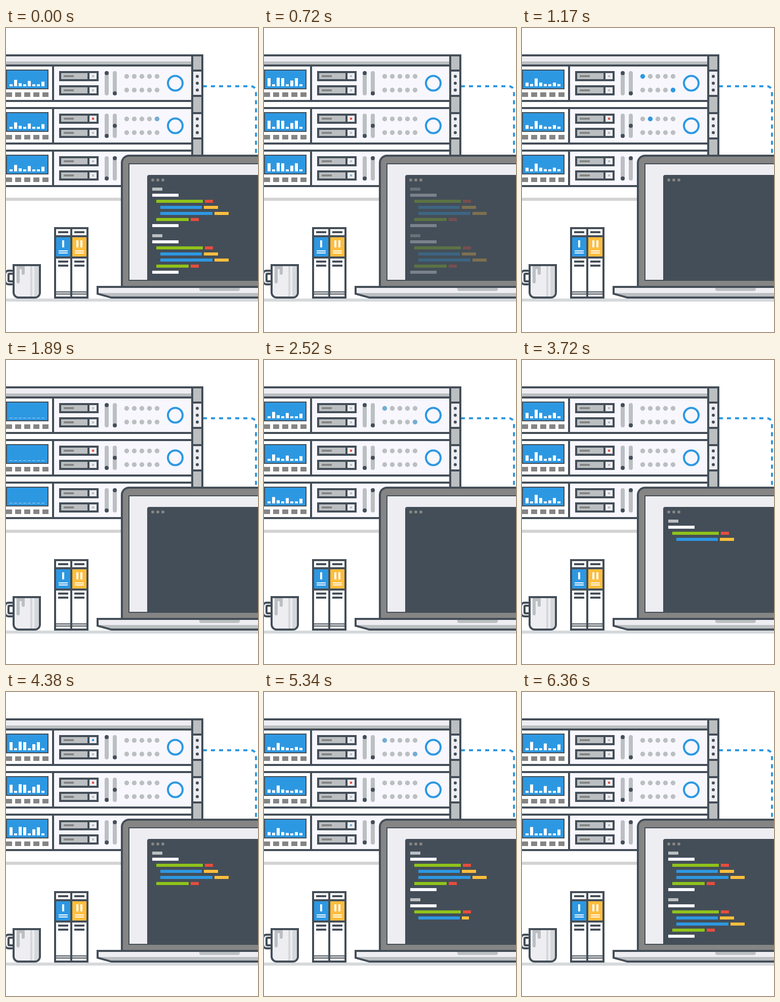
Write an HTML page with a canvas that moves like this. It is 498x600 px and loops after 6390 ms.

```html
<!DOCTYPE html>
<html lang="en">
<head>
<meta charset="utf-8">
<title>Server room desk</title>
<style>
html, body { margin: 0; width: 100%; height: 100%; overflow: hidden; background: #fff; }
canvas { display: block; width: 498px; height: 600px; }
</style>
</head>
<body>
<canvas id="stage" width="498" height="600"></canvas>
<script>
const ctx = document.getElementById('stage').getContext('2d');
const LOOP = 6390, STEP = 30;
const DARK = '#444e58', LIGHT = '#ededf2', PALE = '#f7f7fd', GRAY = '#bbbfc1', MID = '#858585',
      BLUE = '#2d98e2', RED = '#e84c3d', GREEN = '#8fc31a', YELLOW = '#ffbe3d', WHITE = '#fff';

// Rectangles are given by their edges: left, top, right, bottom.
function box(color, x0, y0, x1, y1) {
  ctx.fillStyle = color;
  ctx.fillRect(x0, y0, x1 - x0, y1 - y0);
}
function round(color, x0, y0, x1, y1, r) {
  ctx.fillStyle = color;
  ctx.beginPath();
  ctx.roundRect(x0, y0, x1 - x0, y1 - y0, r);
  ctx.fill();
}
function disc(color, x, y, r) {
  ctx.fillStyle = color;
  ctx.beginPath();
  ctx.arc(x, y, r, 0, Math.PI * 2);
  ctx.fill();
}
function poly(color, points) {
  ctx.fillStyle = color;
  ctx.beginPath();
  points.forEach(([x, y]) => ctx.lineTo(x, y));
  ctx.fill();
}
const clamp = v => Math.max(0, Math.min(1, v));
const mod = (a, n) => ((a % n) + n) % n;
const smooth = v => { v = clamp(v); return v * v * (3 - 2 * v); };

// Blinking lamps: first start and period in ms
const lamps = {
  dot00: [1080, 1410], dot09: [1080, 1410], dot11: [1080, 1500], dot14: [-30, 1605],
  led00: [330, 1320], led20: [110, 1300], led21: [500, 1100]
};
function lampColor(name, t) {
  if (!lamps[name]) return GRAY;
  const [first, period] = lamps[name];
  const age = mod(t - first, period);
  const k = clamp(Math.min(age, 240 - age) / 60);
  const mix = (a, b) => Math.round(a + (b - a) * k);
  return `rgb(${mix(187, 45)},${mix(191, 152)},${mix(193, 226)})`;
}

// Each group of bars swells once per beat; all sink to the base line once per loop.
const BEAT = 553, REST = 1980;
function barHeights(t) {
  const phase = mod((t + LOOP - REST) % LOOP / BEAT + 0.13, 1);
  const bump = (center, width, gain) => {
    const d = Math.abs(phase - center);
    return smooth(gain * (1 - Math.min(d, 1 - d) / width));
  };
  const a = 14 * bump(0, 0.25, 1), b = 12 * bump(0.47, 0.35, 1.2),
        c = 13 * bump(0.4, 0.35, 1.6), d = 8 * bump(0.5, 0.3, 1.2);
  const scale = smooth((Math.abs(t - REST) - 80) / 250);
  return [b, a, c, b, a * 0.75, d, b, a * 0.6].map(h => Math.max(0.6, (4 + h) * scale));
}

function drive(y, led) {
  box(DARK, 105, y, 183, y + 20);
  box(GRAY, 109, y + 4, 161, y + 16);
  box(LIGHT, 165, y + 4, 179, y + 16);
  box(MID, 114, y + 8, 134, y + 12);
  box(led, 170, y + 8, 174, y + 12);
}
function slider(x, y, knob) {
  round(GRAY, x - 4, y, x + 4, y + 48, 4);
  disc(DARK, x, y + knob, 4);
}
function unit(row, t) {
  const y = 72 + row * 84;
  box(DARK, 0, y, 370, y + 74);
  box(WHITE, 0, y + 4, 91, y + 70);
  box(PALE, 95, y + 4, 366, y + 70);

  box(DARK, 0, y + 10, 84, y + 49);
  box(BLUE, 2, y + 12, 82, y + 47);
  barHeights(t).forEach((h, i) => box(WHITE, 7 + i * 9, y + 43 - h, 13 + i * 9, y + 43));
  for (let i = 0; i < 5; i++) box(MID, i * 18, y + 55, i * 18 + 12, y + 64);

  drive(y + 13, row === 1 ? RED : lampColor(`led${row}0`, t));
  drive(y + 41, lampColor(`led${row}1`, t));
  slider(199, y + 13, row ? 44 : 4);
  slider(215, y + 13, [44, 24, 4][row]);

  for (let i = 0; i < 10; i++) {
    disc(lampColor(`dot${row}${i}`, t), 238.5 + i % 5 * 15, y + (i < 5 ? 23.5 : 50.5), 4.7);
  }
  ctx.strokeStyle = BLUE;
  ctx.lineWidth = 4;
  ctx.beginPath();
  ctx.arc(334.5, y + 37, 14.5, 0, Math.PI * 2);
  ctx.stroke();
}
function rack(t) {
  box(DARK, 0, 52, 390, 76);
  box(LIGHT, 0, 56, 366, 66);
  box(GRAY, 0, 66, 366, 72);
  for (let row = 0; row < 3; row++) unit(row, t);

  box(DARK, 366, 52, 390, 314);
  box(GRAY, 370, 56, 386, 310);
  for (const y of [82, 166]) {
    box(DARK, 370, y, 386, y + 54);
    box(LIGHT, 370, y + 4, 386, y + 50);
    for (const dy of [13.5, 27, 40.5]) disc(DARK, 378, y + dy, 3);
  }
  box('#d3d3d3', 0, 335, 240, 341);
}
function cable() {
  ctx.strokeStyle = BLUE;
  ctx.lineWidth = 4;
  ctx.setLineDash([8, 8]);
  ctx.lineDashOffset = 1;
  ctx.beginPath();
  ctx.moveTo(390, 115);
  ctx.lineTo(484, 115);
  ctx.arcTo(494, 115, 494, 125, 10);
  ctx.lineTo(494, 252);
  ctx.stroke();
  ctx.setLineDash([]);
}

// The code is one block shown twice: row, left edge, width, colour
const block = [
  [0, 289, 20, GRAY], [1, 289, 52, PALE],
  [2, 297, 92, GREEN], [2, 393, 16, RED],
  [3, 305, 82, BLUE], [3, 391, 28, YELLOW],
  [4, 305, 103, BLUE], [4, 412, 28, YELLOW],
  [5, 297, 64, GREEN], [5, 365, 16, RED],
  [6, 289, 52, PALE]
];
const TYPE_START = 2878, TYPE_GAP = 152, TYPE_TIME = 60;
function code(t) {
  const typing = t > REST;
  ctx.globalAlpha = typing ? 1 : 1 - smooth((t - 510) / 330);
  for (let i = 0; i < block.length * 2; i++) {
    const [row, x, w, color] = block[i % block.length];
    const y = (i < block.length ? 315 : 407) + row * 12;
    const shown = typing ? smooth((t - TYPE_START - i * TYPE_GAP) / TYPE_TIME) : 1;
    box(color, x, y, x + w * shown, y + 6);
  }
  ctx.globalAlpha = 1;
}
function laptop(t) {
  round(DARK, 227, 250, 520, 513, [16, 0, 0, 0]);
  round(MID, 231, 254, 520, 509, [12, 0, 0, 0]);
  box(DARK, 242, 267, 498, 499);
  box(LIGHT, 244, 269, 498, 497);
  round(DARK, 279, 290, 510, 498, [4, 0, 0, 0]);
  for (const x of [290, 300, 310]) disc(MID, x, 300, 3);
  code(t);

  poly(DARK, [[179, 509], [498, 509], [498, 534], [208, 534], [179, 526]]);
  box(LIGHT, 183, 513, 498, 523);
  poly(GRAY, [[183, 523], [498, 523], [498, 530], [208, 530]]);
  round(GRAY, 382, 513, 462, 519, [0, 0, 4, 4]);
}
function binder(x, color, strokes) {
  box(DARK, x - 4, 393, x + 32, 534);
  box(WHITE, x, 397, x + 28, 409);
  box(color, x, 413, x + 28, 451);
  box(WHITE, x, 455, x + 28, 530);
  for (const y of [401, 459, 467]) box(DARK, x + 4, y, x + 24, y + 4);
  for (const y of [520, 524]) box(DARK, x, y, x + 28, y + 2);
  for (const dx of strokes) box(WHITE, x + dx, 419, x + dx + 4, 433);
  for (const y of [439, 443]) box(WHITE, x + 5, y, x + 23, y + 2);
}
function mug() {
  round(DARK, -4, 477, 20, 508, 9);
  round(LIGHT, 0, 481, 20, 504, 5);
  round(DARK, 3, 483, 20, 502, 4);
  round(WHITE, 7, 487, 20, 498, 1);
  round(DARK, 13, 466, 69, 534, [0, 0, 12, 12]);
  ctx.save();
  ctx.beginPath();
  ctx.roundRect(17, 470, 48, 60, [0, 0, 8, 8]);
  ctx.clip();
  box(LIGHT, 17, 470, 65, 530);
  box('#d5d8da', 48, 470, 52, 530);
  box('#d5d8da', 56, 470, 65, 530);
  round(GRAY, 21, 467, 27, 504, 3);
  box(GRAY, 21, 470, 37, 476);
  round(GRAY, 31, 467, 37, 487, 3);
  ctx.restore();
}

function draw(t) {
  box(WHITE, 0, 0, 498, 600);
  box('#d5d9dc', 0, 534, 498, 540);
  rack(t);
  cable();
  binder(99, BLUE, [12]);
  binder(131, YELLOW, [8, 16]);
  mug();
  laptop(t);
}

const begin = performance.now();
function tick() {
  const t = performance.now() - begin + 2;
  draw(Math.floor(t / STEP) * STEP % LOOP);
  requestAnimationFrame(tick);
}
tick();
</script>
</body>
</html>
```
